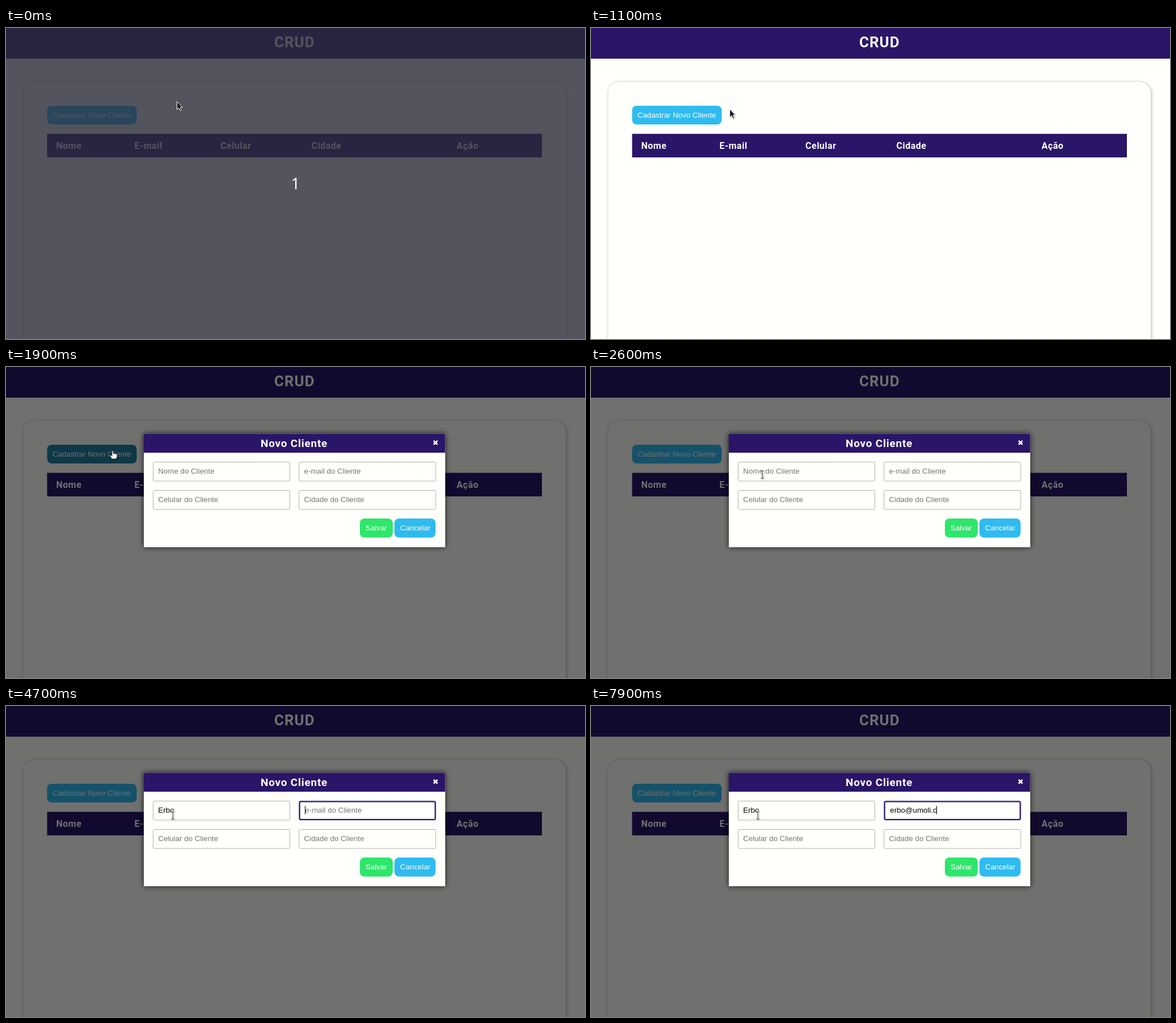
Write an HTML page that moves like this. It is 1021 by 548 pixels and loops after 8000 ms.

```html
<!DOCTYPE html>
<html lang="pt-BR">
<head>
<meta charset="utf-8">
<title>CRUD</title>
<style>
  html, body { margin: 0; width: 100%; height: 100%; overflow: hidden; background: #fffffb; }
  svg { display: block; }
  text { font: 13.333px "Liberation Sans", Arial, sans-serif; fill: #fffffb; white-space: pre; }
  .head { font: 700 16px Roboto, sans-serif; letter-spacing: .5px; }
  .title { font-size: 26px; letter-spacing: 1px; }
  .dialog-title { font-size: 19px; letter-spacing: .75px; }
  .close { font: 13px "DejaVu Sans", sans-serif; }
  .count { font: 27px "Noto Sans", sans-serif; fill: #fff; }
  .purple { fill: #2a1569; }
  .blue { fill: #2fbbf0; }
  .green { fill: #2ee66b; }
  .paper { fill: #fffffb; }
  .card { filter: drop-shadow(1px 1px 3px rgba(0,0,0,.3)); }
  .dialog { filter: drop-shadow(0 0 5px rgba(0,0,0,.8)); }
  .border { fill: #fffffb; stroke: #b1b1ac; }
  .halo { fill: none; stroke: #b9b2d6; stroke-width: 4; }
  .ring { fill: #fffffb; stroke: #2a1569; stroke-width: 2; }
  #cursor { filter: drop-shadow(1px 1px 1px rgba(0,0,0,.3)); }
</style>
</head>
<body>
<svg width="1021" height="548" viewBox="0 0 1021 548">
  <rect class="paper" width="1021" height="548"/>
  <rect class="purple" width="1021" height="54"/>
  <text class="head title" x="473" y="34">CRUD</text>
  <rect class="paper card" x="30.5" y="95" width="956.5" height="500" rx="20"/>
  <rect id="newButton" x="72.5" y="137" width="158" height="33" rx="8"/>
  <text x="82" y="158">Cadastrar Novo Cliente</text>
  <rect class="purple" x="72.5" y="186.5" width="872.5" height="41.5"/>
  <g id="columns"></g>

  <g id="modal">
    <rect width="1021" height="548" opacity=".56"/>
    <rect class="paper dialog" x="243" y="117.5" width="531.5" height="200"/>
    <rect class="purple" x="243" y="117.5" width="531.5" height="33.5"/>
    <text class="head dialog-title" x="449" y="141">Novo Cliente</text>
    <text class="close" x="757.5" y="138" text-anchor="middle">✖</text>
    <g id="fields"></g>
    <rect class="green" x="624" y="267" width="58" height="33.5" rx="8"/>
    <text x="634" y="288">Salvar</text>
    <rect class="blue" x="685" y="267" width="72.5" height="33.5" rx="8"/>
    <text x="695" y="288">Cancelar</text>
  </g>

  <g id="countdown">
    <rect width="1021" height="548" fill="rgba(40,42,54,.8)"/>
    <text class="count" x="510.5" y="284" text-anchor="middle">1</text>
  </g>

  <g id="cursor">
    <path id="arrow" d="M0 0V14.5L3.3 11.4 5.6 16.5 8 15.4 5.8 10.4H10Z" fill="#1a1a1a" stroke="#fff"/>
    <path id="hand" d="M-1.2 1Q0-.8 1.2 1V5.4Q2.6 4.4 3.6 5.8 5 5 5.9 6.4 7.8 6 8 7.8V11L6.5 15H-1.5L-4.6 9.5Q-4.8 7.6-3 8.2L-1.2 10Z" fill="#fff" stroke="#222"/>
    <g id="beam" fill="none">
      <path d="M-2.5-6.5H2.5M0-6.5V6.5M-2.5 6.5H2.5" stroke="#fff" stroke-width="3"/>
      <path d="M-2.5-6.5H2.5M0-6.5V6.5M-2.5 6.5H2.5" stroke="#222"/>
    </g>
  </g>
</svg>
<script>
const LOOP = 8000, STEP = 100;
const el = id => document.getElementById(id);
const show = (node, on) => { node.style.display = on ? '' : 'none'; };
const clamp = v => Math.min(1, Math.max(0, v));
const progress = (t, from, to) => clamp((t - from) / (to - from));

function add(parent, tag, attrs, content = '') {
  const node = document.createElementNS('http://www.w3.org/2000/svg', tag);
  for (const key in attrs) node.setAttribute(key, attrs[key]);
  node.textContent = content;
  return parent.appendChild(node);
}

[['Nome', 88.5], ['E-mail', 226.5], ['Celular', 378], ['Cidade', 538.5], ['Ação', 794.5]]
  .forEach(([label, x]) => add(el('columns'), 'text', { class: 'head', x, y: 212.5 }, label));

function makeField(x, y, placeholder) {
  const box = (cls, inset) => add(el('fields'), 'rect', {
    class: cls, x: x + inset, y: y + inset, width: 242 - 2 * inset, height: 34.5 - 2 * inset, rx: 2
  });
  const border = box('border', .5), halo = box('halo', 1.5), ring = box('ring', 1.5);
  const label = add(el('fields'), 'text', { y: y + 21.2 });
  const caret = add(el('fields'), 'rect', { y: y + 9, width: 1, height: 15, fill: '#000' });
  return (value, focused, caretOn) => {
    show(border, !focused);
    show(halo, focused);
    show(ring, focused);
    show(caret, focused && caretOn);
    const left = x + (focused ? 11 : 9.3);
    label.textContent = value || placeholder;
    label.style.fill = value ? '#000' : '#757575';
    label.setAttribute('x', left);
    if (focused) caret.setAttribute('x', Math.floor(left + (value ? label.getComputedTextLength() : 0)));
  };
}
const nameField = makeField(259, 167, 'Nome do Cliente');
const emailField = makeField(516.3, 167, 'e-mail do Cliente');
makeField(259, 217, 'Celular do Cliente')('', false);
makeField(516.3, 217, 'Cidade do Cliente')('', false);

// Each entry is the moment one character appears.
const typed = (text, times, t) => text.slice(0, times.filter(at => at <= t).length);
const nameKeys = [3600, 3900, 4300, 4300];
const emailKeys = [5400, 5600, 5800, 6400, 6500, 6900, 7100, 7200, 7400, 7600, 7800, 7900];

// Pointer hotspot: time, x, y
const path = [
  [300, 301.5, 129.5], [400, 299.5, 131.5], [500, 299.5, 131.5], [900, 272, 139], [1200, 231, 145],
  [1500, 189, 147], [1600, 188, 147], [2200, 188, 147], [2400, 242, 168],
  [2600, 302, 189.5], [2800, 294.5, 192.5], [2900, 294, 192.5]
];
function pointer(t) {
  const next = path.findIndex(p => p[0] > t);
  if (next === 0) return path[0].slice(1);
  if (next < 0) return path[path.length - 1].slice(1);
  const [t0, x0, y0] = path[next - 1], [t1, x1, y1] = path[next];
  const k = progress(t, t0, t1);
  return [x0 + (x1 - x0) * k, y0 + (y1 - y0) * k];
}

function render(t) {
  show(el('countdown'), t < 200);
  show(el('modal'), t >= 1900);

  const hover = progress(t, 1200, 1600) - progress(t, 2200, 2600);
  const mix = (a, b) => Math.round(a + (b - a) * hover);
  el('newButton').setAttribute('fill', `rgb(${mix(47, 31)},${mix(187, 128)},${mix(240, 162)})`);

  const caretOff = t >= 3300 && t < 3600 || t >= 5300 && t < 5400;
  nameField(typed('Erbo', nameKeys, t), t >= 2800 && t < 4700, !caretOff);
  emailField(typed('erbo@umoli.c', emailKeys, t), t >= 4700, !caretOff);

  const [x, y] = pointer(t);
  const onButton = t < 2300 && x <= 230.5 && y >= 137;
  const onField = t >= 1900 && x > 259 && y > 167;
  el('cursor').setAttribute('transform', `translate(${x} ${y})`);
  show(el('hand'), onButton);
  show(el('beam'), onField);
  show(el('arrow'), !onButton && !onField);
}

const start = performance.now();
function tick() {
  const t = (performance.now() - start) % LOOP;
  render(Math.floor(t / STEP) * STEP);
  requestAnimationFrame(tick);
}
tick();
</script>
</body>
</html>
```
